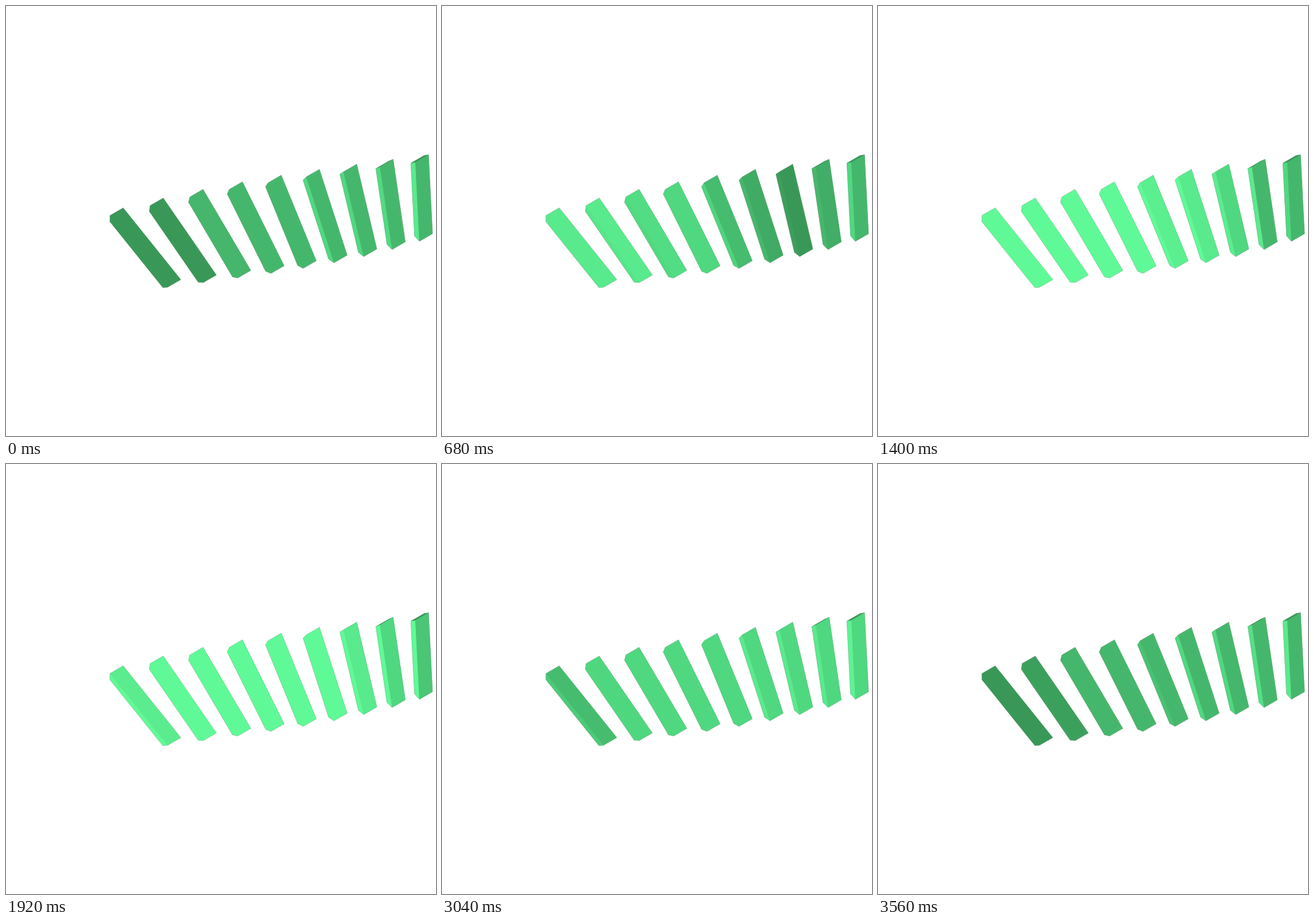
Recreate the animation shown at these times as an HTML page. Size 748 by 748 pixels, loop 3.6 s.

```html
<!DOCTYPE html>
<html lang="en">
<head>
<meta charset="utf-8">
<title>Green bars</title>
<style>
  html, body { margin: 0; width: 100%; height: 100%; overflow: hidden; background: #fff; }
  svg { display: block; width: 748px; height: 748px; }
  .edge { fill: none; stroke: #8fa397; stroke-width: .6; stroke-opacity: .8; }
</style>
</head>
<body>
<svg id="stage" viewBox="0 0 748 748"></svg>
<script>
const LOOP = 3600, STEP = 40, FADE = 110;
const COUNT = 9, ORIGIN = [189.7, 505];
const RADIUS = 148.5, PITCH = 60.7, FIRST = 30, TURN = 7.07;
const LENGTH = 133.8, WIDTH = 26.6, DEPTH = 9.5, BEVEL = 5.4;
const shades = [[57, 152, 88], [69, 183, 108], [79, 216, 128], [89, 234, 141], [95, 250, 151]];

// Times (ms) of brightening and dimming for the first, middle and last bar.
const frontLight = {
  up: [[150, 330, 620, 880], [510, 720, 1060, 1420], [1300, 1925, 2600, 3200]],
  down: [[1880, 2350, 3000, 3420], [2100, 2700, 3320, 3900], [1700, 2500, 3500, 4440]]
};
const sideLight = {
  up: [[150, 330, 600, 830], [500, 640, 910, 1150], [950, 1150, 1450, 1800]],
  down: [[2000, 2450, 3050, 3420], [2450, 2950, 3540, 3930], [3050, 3800, 4340, 4550]]
};

const stage = document.getElementById('stage');
const clamp = (v, lo, hi) => Math.min(hi, Math.max(lo, v));

// Isometric view: z runs along the spiral's axis, x and y lie across it.
const COS = Math.cos(Math.PI / 6), SIN = .5;
const project = (x, y, z) => [
  ORIGIN[0] + (x + z) * COS,
  ORIGIN[1] + (x - z) * SIN + y
];

function polygon(points, cls) {
  const el = document.createElementNS('http://www.w3.org/2000/svg', 'polygon');
  el.setAttribute('points', points.map(p => p.map(v => v.toFixed(2)).join()).join(' '));
  if (cls) el.setAttribute('class', cls);
  return stage.appendChild(el);
}

function color(level) {
  const i = Math.min(3, Math.floor(level)), f = level - i;
  return `rgb(${shades[i].map((c, k) => Math.round(c + (shades[i + 1][k] - c) * f))})`;
}

// Parabola through the first, middle and last row.
function blend(rows, s) {
  const [a, b, c] = [(1 - s) * (1 - 2 * s), 4 * s * (1 - s), s * (2 * s - 1)];
  return rows[0].map((v, k) => a * v + b * rows[1][k] + c * rows[2][k]);
}

const passed = (times, t) =>
  times.reduce((sum, at) => sum + clamp((t - at) / FADE + .5, 0, 1), 0);

const pulse = ({ up, down }, t) => Math.min(passed(up, t), 4 - passed(down, t));
const level = (light, t) => clamp(pulse(light, t) + pulse(light, t + LOOP), 0, 4);

const faces = [];
function addFace(els, light, s) {
  faces.push({ els, light: { up: blend(light.up, s), down: blend(light.down, s) } });
}

for (let i = 0; i < COUNT; i++) {
  const angle = (FIRST + TURN * i) * Math.PI / 180;
  const cos = Math.cos(angle), sin = Math.sin(angle);
  const corner = (along, depth, across) => {
    const r = RADIUS - depth;
    return project(along * cos + r * sin, along * sin - r * cos, PITCH * i + across);
  };
  const half = LENGTH / 2, inner = half - BEVEL;
  const a = corner(-half, 0, -WIDTH), b = corner(-half, 0, 0);
  const c = corner(half, 0, 0), d = corner(half, 0, -WIDTH);
  const e = corner(inner, DEPTH, -WIDTH), f = corner(-inner, DEPTH, -WIDTH);
  const back = corner(-inner, DEPTH, 0);

  const capShows = (b[0] - a[0]) * (back[1] - a[1]) < (b[1] - a[1]) * (back[0] - a[0]);
  const outline = [f, capShows ? back : a, b, c, d, e];
  const base = polygon(outline);
  const side = polygon([f, a, d, e]);
  const front = polygon([a, b, c, d]);
  if (capShows) polygon([f, back, b, a]).setAttribute('fill', color(0));
  polygon(outline, 'edge');

  const s = i / (COUNT - 1);
  addFace([base, front], frontLight, s);
  addFace([side], sideLight, s);
}

function draw(now) {
  const t = Math.floor(now % LOOP / STEP) * STEP;
  for (const { els, light } of faces) {
    const fill = color(level(light, t));
    els.forEach(el => el.setAttribute('fill', fill));
  }
}

let start;
function tick(now) {
  start ??= now;
  draw(now - start);
  requestAnimationFrame(tick);
}
draw(0);
requestAnimationFrame(tick);
</script>
</body>
</html>
```
